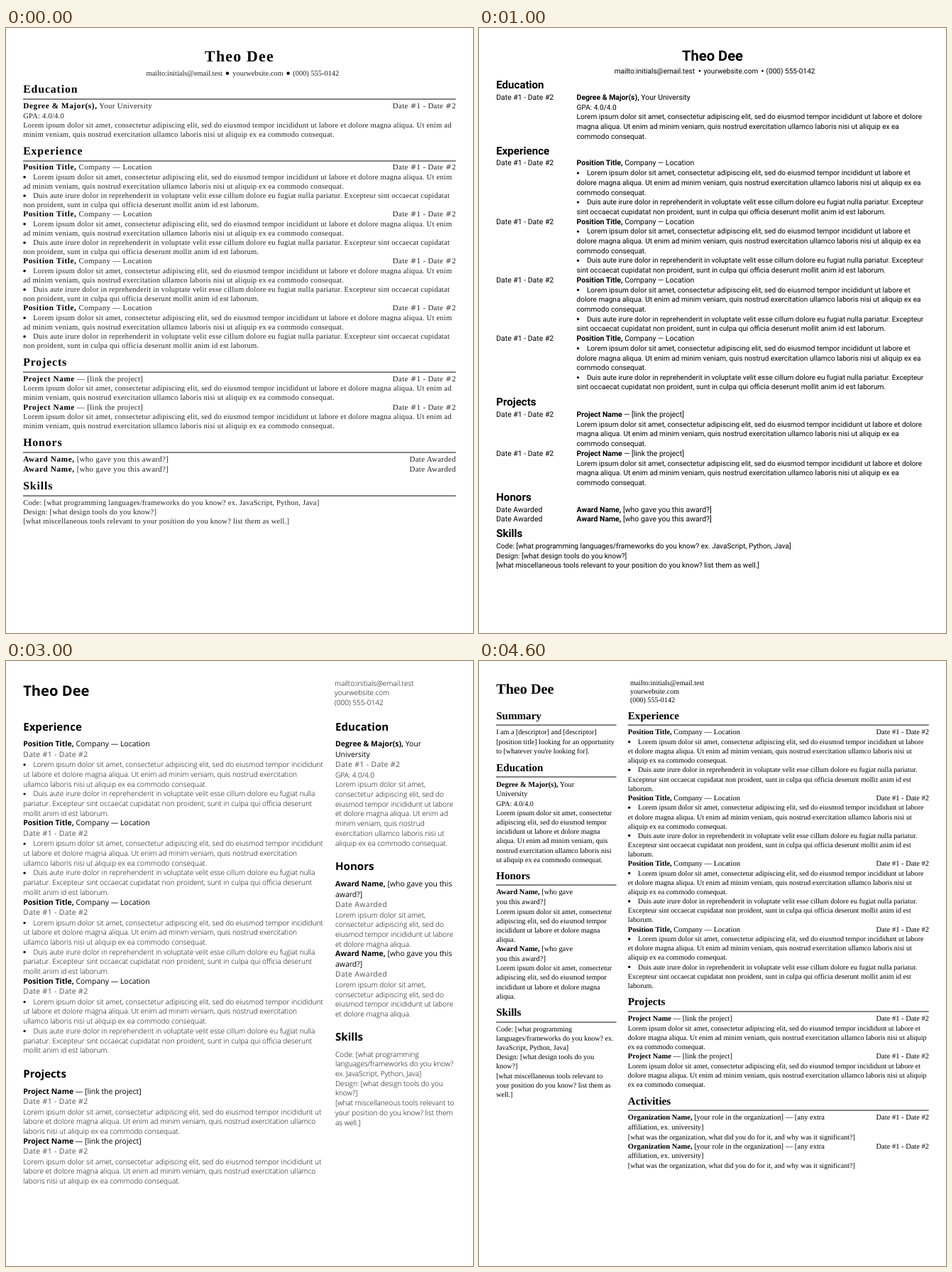
These frames come from a looping animation (658 px wide and 851 px high, 5 s). An HTML page:

```html
<!DOCTYPE html>
<html lang="en">
<head>
<meta charset="utf-8">
<title>Resume layouts</title>
<style>
html, body { margin: 0; width: 100%; height: 100%; overflow: hidden; background: #fff; }
svg { display: block; width: 658px; height: 851px; }
text { text-rendering: geometricPrecision; white-space: pre; }
.name { font-size: 20.16px; }
.head { font-size: 15.1px; }
.title, .date { font-size: 10.48px; }
.body { font-size: 10.08px; }
.name, .head, .bold { font-weight: 700; }

.latin { font-family: "Liberation Serif", "Times New Roman", serif; }
.latin .name { font-size: 21.9px; }
.latin .head { font-size: 15.8px; }
.latin .title { font-size: 10.9px; letter-spacing: .03em; fill: #222; }
.latin .body { font-size: 10.6px; letter-spacing: .0202em; fill: #222; }
.latin .contact { font-size: 10.4px; letter-spacing: 0; }
.latin .bold { font-size: 11.2px; fill: #000; }
.latin .name, .latin .head, .latin .bold { letter-spacing: .055em; }
.latin .hash { font-family: "DejaVu Sans", sans-serif; font-size: 10.2px; fill: #444; }

.grotesk { font-family: Roboto, sans-serif; }

.mono { font-family: "Liberation Mono", "DejaVu Sans Mono", monospace; }
.mono .name { font-size: 20.56px; }
.mono .head { font-size: 15.4px; }
.mono .title { font-size: 10.69px; }
.mono .body { font-size: 10.28px; }

.humanist { font-family: "Open Sans", sans-serif; }
.humanist .body { font-weight: 300; }
.humanist .title { font-weight: 500; }
.humanist .title .bold { font-weight: 700; }
.humanist .date { font-weight: 500; letter-spacing: .32px; fill: #555; }

.times { font-family: "Liberation Serif", "Times New Roman", serif; }
</style>
</head>
<body>
<svg viewBox="0 0 658 851"></svg>
<script>
const svg = document.querySelector('svg');
const LEFT = 24.2, RIGHT = 634;
const NAME = 'Theo Dee';
const CONTACT = ['mailto:initials@email.test', 'yourwebsite.com', '(000) 555-0142'];
const DATE = 'Date #1 - Date #2';
const JOB = '^*Position Title,* Company — Location';
const PROJECT = '^*Project Name* — [link the project]';
const DEGREE = '^*Degree & Major(s),* Your University';
const AWARD = '^*Award Name,* [who gave you this award?]';
const SKILLS = [
  'Code: [what programming languages/frameworks do you know? ex. JavaScript, Python, Java]',
  'Design: [what design tools do you know?]',
  '[what miscellaneous tools relevant to your position do you know? list them as well.]'
];

let out = '', page;

const repeat = (n, lines) => Array(n).fill(lines).flat();
const dated = (line, date = DATE) => line + '\t' + date;

// *stars* mark bold text
const markup = s => s.replace(/&/g, '&amp;')
  .replace(/\*(.+?)\*/g, '<tspan class="bold">$1</tspan>')
  .replace(/#/g, '<tspan class="hash">#</tspan>');

function text(x, y, s, cls = 'body', anchor = 'start') {
  out += `<text x="${x}" y="${y.toFixed(2)}" class="${cls}" text-anchor="${anchor}">${markup(s)}</text>`;
}

function dot(x, y, r) {
  out += `<circle cx="${x}" cy="${y}" r="${r}"/>`;
}

// Line prefixes: ^ title, ~ date, • bullet; a tab separates the date column
function flow(x, y, lines) {
  for (const line of lines) {
    const [main, date] = line.split('\t');
    const mark = main[0];
    const s = '^~•'.includes(mark) ? main.slice(1) : main;
    const cls = mark === '^' ? 'title' : mark === '~' ? 'date' : 'body';
    const bullet = mark === '•';
    if (bullet) dot(x + 1.9, y - 3.2, page.dot);
    text(x + (bullet ? page.indent : 0), y, s, cls);
    if (date) {
      if (page.dateLeft) text(LEFT, y, date, 'title');
      else text(RIGHT, y, date, 'title', 'end');
    }
    y += cls === 'body' ? page.bodyStep : page.titleStep;
  }
}

function section(head, y, lines, { x = LEFT, to = RIGHT, bodyX = x } = {}) {
  text(x, y, head, 'head');
  if (page.rule) out += `<rect x="${x - .2}" y="${Math.round(y + page.rule) - .5}" width="${to - x}" height="1.1" fill="#222"/>`;
  flow(bodyX, y + page.lead, lines);
}

function contactRow(y, mailEnd, dot1, siteX, dot2, phoneX, r) {
  const cls = 'body contact';
  text(mailEnd, y, CONTACT[0], cls, 'end');
  dot(dot1, y - 3.2, r);
  text(siteX, y, CONTACT[1], cls);
  dot(dot2, y - 3.2, r);
  text(phoneX, y, CONTACT[2], cls);
}

function contactList(x, y, step) {
  CONTACT.forEach((s, i) => text(x, y + i * step, s));
}

function layout(cls, metrics, draw) {
  page = metrics;
  out += `<g class="${cls}">`;
  draw();
  out += '</g>';
}

layout('latin', { titleStep: 13.6, bodyStep: 13.1, lead: 21.7, rule: 8.8, indent: 14, dot: 1.8 }, () => {
  const about = [
    'Lorem ipsum dolor sit amet, consectetur adipiscing elit, sed do eiusmod tempor incididunt ut labore et dolore magna aliqua. Ut enim ad',
    'minim veniam, quis nostrud exercitation ullamco laboris nisi ut aliquip ex ea commodo consequat.'
  ];
  text(329, 46.5, NAME, 'name', 'middle');
  contactRow(67, 305, 312, 319.3, 397.6, 404.3, 2.2);
  section('Education', 91.3, [dated(DEGREE), 'GPA: 4.0/4.0', ...about]);
  section('Experience', 177.7, repeat(4, [
    dated(JOB),
    '•Lorem ipsum dolor sit amet, consectetur adipiscing elit, sed do eiusmod tempor incididunt ut labore et dolore magna aliqua. Ut enim',
    'ad minim veniam, quis nostrud exercitation ullamco laboris nisi ut aliquip ex ea commodo consequat.',
    '•Duis aute irure dolor in reprehenderit in voluptate velit esse cillum dolore eu fugiat nulla pariatur. Excepteur sint occaecat cupidatat',
    'non proident, sunt in culpa qui officia deserunt mollit anim id est laborum.'
  ]));
  section('Projects', 475, repeat(2, [dated(PROJECT), ...about]));
  section('Honors', 588.3, repeat(2, [dated(AWARD, 'Date Awarded')]));
  section('Skills', 649.3, SKILLS);
});

layout('grotesk', { titleStep: 13.95, bodyStep: 13.65, lead: 15.8, indent: 14.3, dot: 1.6, dateLeft: true }, () => {
  const column = { bodyX: 137.6 };
  const about = [
    'Lorem ipsum dolor sit amet, consectetur adipiscing elit, sed do eiusmod tempor incididunt ut labore et dolore',
    'magna aliqua. Ut enim ad minim veniam, quis nostrud exercitation ullamco laboris nisi ut aliquip ex ea',
    'commodo consequat.'
  ];
  text(329, 46.4, NAME, 'name', 'middle');
  contactRow(63.6, 304, 311, 316.4, 399.5, 404.6, 1.3);
  section('Education', 85, [dated(DEGREE), 'GPA: 4.0/4.0', ...about], column);
  section('Experience', 177.5, repeat(4, [
    dated(JOB),
    '•Lorem ipsum dolor sit amet, consectetur adipiscing elit, sed do eiusmod tempor incididunt ut labore et',
    'dolore magna aliqua. Ut enim ad minim veniam, quis nostrud exercitation ullamco laboris nisi ut aliquip ex ea',
    'commodo consequat.',
    '•Duis aute irure dolor in reprehenderit in voluptate velit esse cillum dolore eu fugiat nulla pariatur. Excepteur',
    'sint occaecat cupidatat non proident, sunt in culpa qui officia deserunt mollit anim id est laborum.'
  ]), column);
  section('Projects', 531, repeat(2, [dated(PROJECT), ...about]), column);
  section('Honors', 664.7, repeat(2, [dated(AWARD, 'Date Awarded')]), column);
  section('Skills', 716.2, SKILLS);
});

layout('mono', { titleStep: 13.4, bodyStep: 13.1, lead: 22.6, rule: 8.4, indent: 15.1, dot: 2.1 }, () => {
  const lorem = 'Lorem ipsum dolor sit amet, consectetur adipiscing elit, sed do eiusmod tempor incididunt ut';
  const rest = [
    'labore et dolore magna aliqua. Ut enim ad minim veniam, quis nostrud exercitation ullamco laboris',
    'nisi ut aliquip ex ea commodo consequat.'
  ];
  text(329, 49.8, NAME, 'name', 'middle');
  contactRow(72.3, 303.2, 309.7, 316, 417.2, 423.5, 1.4);
  section('Education', 97.8, [dated(DEGREE), 'GPA: 4.0/4.0', lorem, ...rest]);
  section('Experience', 197.8, repeat(4, [
    dated(JOB),
    '•' + lorem,
    ...rest,
    '•Duis aute irure dolor in reprehenderit in voluptate velit esse cillum dolore eu fugiat nulla',
    'pariatur. Excepteur sint occaecat cupidatat non proident, sunt in culpa qui ofﬁcia deserunt mollit',
    'anim id est laborum.'
  ]));
  section('Projects', 599.8, repeat(2, [dated(PROJECT), lorem, 'labore et dolore magna aliqua.']));
  section('Honors', 712.6, repeat(2, [dated(AWARD, 'Date Awarded')]));
  section('Skills', 772.8, SKILLS);
});

layout('humanist', { titleStep: 14.5, bodyStep: 13.7, lead: 22.6, indent: 14.3, dot: 1.6 }, () => {
  const side = { x: 464 };
  text(LEFT, 49, NAME, 'name');
  contactList(463, 34.6, 13.7);
  section('Experience', 97.5, repeat(4, [
    JOB, '~' + DATE,
    '•Lorem ipsum dolor sit amet, consectetur adipiscing elit, sed do eiusmod tempor incididunt',
    'ut labore et dolore magna aliqua. Ut enim ad minim veniam, quis nostrud exercitation',
    'ullamco laboris nisi ut aliquip ex ea commodo consequat.',
    '•Duis aute irure dolor in reprehenderit in voluptate velit esse cillum dolore eu fugiat nulla',
    'pariatur. Excepteur sint occaecat cupidatat non proident, sunt in culpa qui officia deserunt',
    'mollit anim id est laborum.'
  ]));
  section('Projects', 586, repeat(2, [
    PROJECT, '~' + DATE,
    'Lorem ipsum dolor sit amet, consectetur adipiscing elit, sed do eiusmod tempor incididunt ut',
    'labore et dolore magna aliqua. Ut enim ad minim veniam, quis nostrud exercitation ullamco',
    'laboris nisi ut aliquip ex ea commodo consequat.'
  ]));
  section('Education', 97.5, [
    '^*Degree & Major(s),* Your', '^University', '~' + DATE, 'GPA: 4.0/4.0',
    'Lorem ipsum dolor sit amet,', 'consectetur adipiscing elit, sed do',
    'eiusmod tempor incididunt ut labore', 'et dolore magna aliqua. Ut enim ad',
    'minim veniam, quis nostrud', 'exercitation ullamco laboris nisi ut',
    'aliquip ex ea commodo consequat.'
  ], side);
  section('Honors', 294.4, repeat(2, [
    '^*Award Name,* [who gave you this', '^award?]', '~Date Awarded',
    'Lorem ipsum dolor sit amet,', 'consectetur adipiscing elit, sed do',
    'eiusmod tempor incididunt ut labore', 'et dolore magna aliqua.'
  ]), side);
  section('Skills', 534, [
    'Code: [what programming', 'languages/frameworks do you know?', 'ex. JavaScript, Python, Java]',
    'Design: [what design tools do you', 'know?]',
    '[what miscellaneous tools relevant to', 'your position do you know? list them', 'as well.]'
  ], side);
});

layout('times', { titleStep: 13.6, bodyStep: 13.13, lead: 21.7, rule: 8.4, indent: 14.2, dot: 1.7 }, () => {
  const side = { to: 193.7 }, main = { x: 209.8 };
  text(LEFT, 45.8, NAME, 'name');
  contactList(213, 33.6, 12.1);
  section('Summary', 81.7, [
    'I am a [descriptor] and [descriptor]', '[position title] looking for an opportunity',
    "to [whatever you're looking for]."
  ], side);
  section('Education', 155, [
    '^*Degree & Major(s),* Your', '^University', 'GPA: 4.0/4.0',
    'Lorem ipsum dolor sit amet, consectetur', 'adipiscing elit, sed do eiusmod tempor',
    'incididunt ut labore et dolore magna', 'aliqua. Ut enim ad minim veniam, quis',
    'nostrud exercitation ullamco laboris nisi', 'ut aliquip ex ea commodo consequat.'
  ], side);
  section('Honors', 306.7, repeat(2, [
    '^*Award Name,* [who gave', '^you this award?]',
    'Lorem ipsum dolor sit amet, consectetur', 'adipiscing elit, sed do eiusmod tempor',
    'incididunt ut labore et dolore magna', 'aliqua.'
  ]), side);
  section('Skills', 499.2, [
    'Code: [what programming', 'languages/frameworks do you know? ex.', 'JavaScript, Python, Java]',
    'Design: [what design tools do you', 'know?]',
    '[what miscellaneous tools relevant to', 'your position do you know? list them as', 'well.]'
  ], side);
  section('Experience', 81.7, repeat(4, [
    dated(JOB),
    '•Lorem ipsum dolor sit amet, consectetur adipiscing elit, sed do eiusmod tempor incididunt ut labore',
    'et dolore magna aliqua. Ut enim ad minim veniam, quis nostrud exercitation ullamco laboris nisi ut',
    'aliquip ex ea commodo consequat.',
    '•Duis aute irure dolor in reprehenderit in voluptate velit esse cillum dolore eu fugiat nulla pariatur.',
    'Excepteur sint occaecat cupidatat non proident, sunt in culpa qui officia deserunt mollit anim id est',
    'laborum.'
  ]), main);
  section('Projects', 484.4, repeat(2, [
    dated(PROJECT),
    'Lorem ipsum dolor sit amet, consectetur adipiscing elit, sed do eiusmod tempor incididunt ut labore et',
    'dolore magna aliqua. Ut enim ad minim veniam, quis nostrud exercitation ullamco laboris nisi ut aliquip',
    'ex ea commodo consequat.'
  ]), main);
  section('Activities', 623.6, repeat(2, [
    dated('^*Organization Name,* [your role in the organization] — [any extra'),
    '^affiliation, ex. university]',
    '[what was the organization, what did you do for it, and why was it significant?]'
  ]), main);
});

svg.innerHTML = out;
const pages = [...svg.children];

function tick() {
  const shown = Math.floor(performance.now() / 1000) % pages.length;
  pages.forEach((g, i) => g.style.display = i === shown ? '' : 'none');
  requestAnimationFrame(tick);
}
tick();
</script>
</body>
</html>
```
